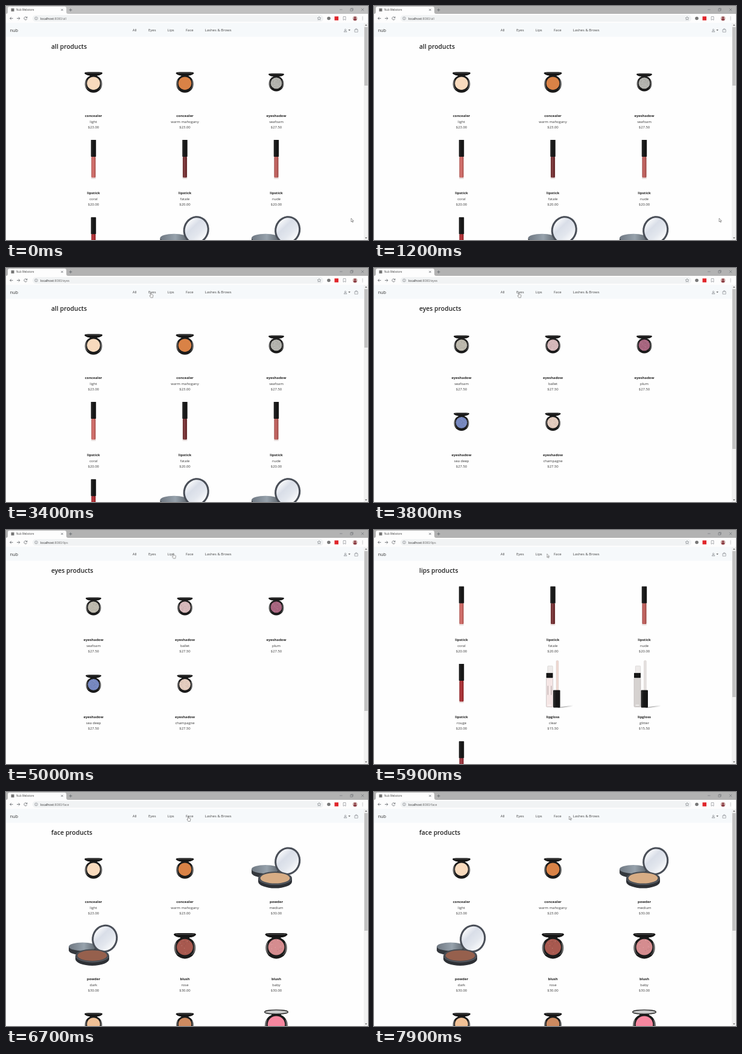
An HTML page that plays this animation: 600x388 px, repeating every 8000 ms.

```html
<!DOCTYPE html>
<html lang="en">
<head>
<meta charset="utf-8">
<title>Nub Webstore</title>
<style>
html, body { margin: 0; width: 100%; height: 100%; overflow: hidden; background: #fefefe; }
svg { display: block; width: 600px; height: 388px; font-family: "Open Sans", "Noto Sans", sans-serif; }
.anim { animation: 8s step-end infinite; }
.mid { text-anchor: middle; }
.line { fill: none; stroke: #5f6368; stroke-width: .8; }
.thin { stroke-width: .5; }
.pale { stroke: #aaa; }

#strip { animation-name: focus; }
#all { animation-name: all; }
#eyes { animation-name: eyes; }
#lips { animation-name: lips; }
#face { animation-name: face; }
#url-all { animation-name: url-all; }
#url-eyes { animation-name: url-eyes; }
#url-lips { animation-name: url-lips; }
#url-face { animation-name: url-face; }
#cursor { animation-name: move; }
#arrow { animation-name: arrow; }
#hand { animation-name: hand; }

@keyframes focus { 0% { fill: #c0c0c0 } 15%, 100% { fill: #b2b2b2 } }

@keyframes all { 0% { opacity: 1 } 45%, 100% { opacity: 0 } }
@keyframes eyes { 0% { opacity: 0 } 45% { opacity: 1 } 63.75%, 100% { opacity: 0 } }
@keyframes lips { 0% { opacity: 0 } 63.75% { opacity: 1 } 80%, 100% { opacity: 0 } }
@keyframes face { 0% { opacity: 0 } 80%, 100% { opacity: 1 } }

@keyframes url-all { 0% { opacity: 1 } 42.5%, 100% { opacity: 0 } }
@keyframes url-eyes { 0% { opacity: 0 } 42.5% { opacity: 1 } 62.5%, 100% { opacity: 0 } }
@keyframes url-lips { 0% { opacity: 0 } 62.5% { opacity: 1 } 78.75%, 100% { opacity: 0 } }
@keyframes url-face { 0% { opacity: 0 } 78.75%, 100% { opacity: 1 } }

@keyframes move {
  0% { transform: translate(572px, 352px) }
  21.25% { transform: translate(556px, 310px) }
  22.5% { transform: translate(497px, 150px) }
  23.75% { transform: translate(449.5px, 57.5px) }
  27.5% { transform: translate(372px, 54px) }
  28.75% { transform: translate(288px, 49px) }
  30% { transform: translate(241px, 46.5px) }
  33.75% { transform: translate(240px, 44px) }
  35% { transform: translate(240px, 42px) }
  36.25% { transform: translate(240px, 40.5px) }
  52.5% { transform: translate(244px, 40px) }
  53.75% { transform: translate(252px, 40px) }
  55% { transform: translate(260px, 40px) }
  56.25% { transform: translate(268px, 39.5px) }
  57.5% { transform: translate(274px, 39px) }
  58.75% { transform: translate(277.5px, 38.5px) }
  73.75% { transform: translate(286.5px, 39.5px) }
  75% { transform: translate(293px, 40px) }
  76.25% { transform: translate(299px, 40px) }
  77.5% { transform: translate(302px, 40px) }
  97.5% { transform: translate(313px, 40px) }
  98.75%, 100% { transform: translate(323.5px, 40px) }
}
@keyframes arrow {
  0% { opacity: 1 } 33.75% { opacity: 0 } 53.75% { opacity: 1 } 56.25% { opacity: 0 }
  73.75% { opacity: 1 } 76.25% { opacity: 0 } 97.5%, 100% { opacity: 1 }
}
@keyframes hand {
  0% { opacity: 0 } 33.75% { opacity: 1 } 53.75% { opacity: 0 } 56.25% { opacity: 1 }
  73.75% { opacity: 0 } 76.25% { opacity: 1 } 97.5%, 100% { opacity: 0 }
}
</style>
</head>
<body>
<svg viewBox="0 0 600 388">
  <defs>
    <linearGradient id="glass" x1="0" y1=".2" x2="1" y2=".8">
      <stop offset="0" stop-color="#fff"/><stop offset=".35" stop-color="#d9dee8"/>
      <stop offset=".65" stop-color="#e3e7ee"/><stop offset="1" stop-color="#fff"/>
    </linearGradient>
    <linearGradient id="lid" x1="0" x2="1">
      <stop offset="0" stop-color="#6f7882"/><stop offset=".55" stop-color="#97a2ac"/><stop offset="1" stop-color="#5d656d"/>
    </linearGradient>
    <linearGradient id="case" x1="0" x2="1">
      <stop offset="0" stop-color="#8a8a8a"/><stop offset=".12" stop-color="#1a1a1a"/>
      <stop offset=".88" stop-color="#1a1a1a"/><stop offset="1" stop-color="#8a8a8a"/>
    </linearGradient>
    <linearGradient id="shade" x1="0" x2="1">
      <stop offset="0" stop-color="#000" stop-opacity=".2"/><stop offset=".35" stop-color="#fff" stop-opacity=".15"/>
      <stop offset="1" stop-color="#000" stop-opacity=".2"/>
    </linearGradient>
    <linearGradient id="fade" x1="0" x2="1">
      <stop offset="0" stop-color="#666"/><stop offset="1" stop-color="#999" stop-opacity="0"/>
    </linearGradient>
  </defs>
  <rect width="600" height="388" fill="#fefefe"/>

  <!-- browser -->
  <rect id="strip" class="anim" width="600" height="13"/>
  <path d="M0 13Q3 13 3 10V4Q3 1 6 1H97Q100 1 100 4V10Q100 13 103 13Z" fill="#fdfdfd"/>
  <rect x="8.5" y="4" width="5" height="5" fill="#777"/>
  <text x="17" y="8.3" font-size="4.4" fill="#444">Nub Webstore</text>
  <path class="line" d="M91.3 4.8l3.2 3.2m0-3.2l-3.2 3.2M104.5 6.5h5m-2.5-2.5v5"/>
  <path class="line thin" d="M553 6h4.5M570.8 4.8h3.4v3.4h-3.4zM571.8 4.8v-1h3.4v3.4h-1M588.8 3.8l4.4 4.4m0-4.4l-4.4 4.4"/>
  <rect y="13" width="600" height="15" fill="#fdfdfd"/>
  <rect x="44" y="15" width="482" height="11" rx="5.5" fill="#f1f3f4"/>
  <path class="line" d="M11.5 20.5h-5m2.3-2.3l-2.3 2.3 2.3 2.3"/>
  <path class="line" d="M18 20.5h5m-2.3-2.3l2.3 2.3-2.3 2.3"/>
  <path class="line" d="M34.6 19.2a2.5 2.5 0 1 0 .2 2.2M35 17.6v2h-2"/>
  <circle class="line thin" cx="50" cy="20.5" r="2.4"/>
  <path class="line thin" d="M50 20.2v1.7M50 18.9v.6"/>
  <g font-size="5.25" fill="#6a6a6a">
    <text x="57" y="22.6"><tspan fill="#222">localhost</tspan>:8080/</text>
    <g id="paths"></g>
  </g>
  <path class="line thin" d="M519 17.6l.9 1.9 2.1.2-1.6 1.4.5 2.1-1.9-1.1-1.9 1.1.5-2.1-1.6-1.4 2.1-.2z"/>
  <circle cx="535" cy="20.5" r="2.8" fill="#777"/>
  <rect x="544.5" y="17.3" width="6.5" height="6.5" fill="#e0262b"/>
  <path class="line thin" d="M559 17.6h4v5.8l-2-1.5-2 1.5z"/>
  <circle cx="578.5" cy="20.5" r="3.8" fill="#c9a5a2"/>
  <path d="M575.7 23a2.9 2.9 0 0 1 5.6 0 3.8 3.8 0 0 1-5.6 0z" fill="#8a3a42"/>
  <circle cx="578.5" cy="19.3" r="1.5" fill="#8a3a42"/>
  <path class="line" d="M591 17.8v.9m0 1.4v.9m0 1.4v.9"/>

  <!-- navigation -->
  <rect y="28" width="593" height="23" fill="#f6f9fb"/>
  <text x="6.5" y="42.6" font-size="7.4" fill="#333">nub</text>
  <g font-size="6" fill="#444">
    <text x="209.8" y="42.2">All</text>
    <text x="236" y="42.2">Eyes</text>
    <text x="267.5" y="42.2">Lips</text>
    <text x="298" y="42.2">Face</text>
    <text x="329.6" y="42.2">Lashes &amp; Brows</text>
  </g>
  <circle class="line thin" cx="562.5" cy="39.5" r="1.2"/>
  <path class="line thin" d="M560.2 43q0-1.9 2.3-1.9t2.3 1.9zM577.9 39.2h5.2v4h-5.2zM579 39.2q0-1.8 1.5-1.8t1.5 1.8"/>
  <path d="M567.3 39.2h3.6l-1.8 1.9z" fill="#444"/>

  <!-- scrollbar -->
  <rect x="593" y="28" width="7" height="360" fill="#f1f1f1"/>
  <path d="M595 32.5h3.6l-1.8-2zM595 383.8h3.6l-1.8 2z" fill="#555"/>

  <g id="pages"></g>

  <g id="cursor" class="anim">
    <path id="arrow" class="anim" d="M0 0V5.9L1.4 4.6 2.4 6.8 3.3 6.4 2.4 4.3H4.2Z" fill="#fff" stroke="#333" stroke-width=".5"/>
    <path id="hand" class="anim" d="M-.7 .6Q0-.4 .7 .6V3.2L3.4 3.9Q4 4.2 3.9 5L3.2 8.6H-.1L-1.9 5.7Q-2 4.8-.7 5.4Z" fill="#fff" stroke="#333" stroke-width=".5"/>
  </g>
</svg>

<script>
const columns = [145, 296.5, 448];
const rowStep = 128.4;

let seed = 7;
const random = () => (seed = seed * 16807 % 2147483647) / 2147483647;

function speckles(count) {
  let out = '';
  for (let i = 0; i < count; i++) {
    const a = random() * 6.283, r = 10 * Math.sqrt(random());
    const fill = i % 2 ? '#fff' : '#444';
    out += `<circle cx="${(r * Math.cos(a)).toFixed(1)}" cy="${(2.2 + r * Math.sin(a)).toFixed(1)}" r=".5" fill="${fill}" opacity=".3"/>`;
  }
  return out;
}

const closedLid = `
  <path d="M-15-14.5Q-15-16.5-9-16.5H9Q15-16.5 15-14.5 13-11.2 6-10.6H-6Q-13-11.2-15-14.5Z" fill="#151515"/>
  <path d="M-12-14.8H12" stroke="#666" stroke-width=".7"/>`;
const openLid = '<ellipse cy="-13.6" rx="14.7" ry="2.6" fill="#c9c9c9" stroke="#222" stroke-width="1"/>';

const compact = (color, scale = 1, dots = 0, lid = closedLid) => `<g transform="scale(${scale})">
  ${lid}
  <rect x="-6" y="-11" width="12" height="4" fill="#1d1d1d"/>
  <circle cy="3.3" r="14.5" fill="url(#case)"/>
  <path d="M-11.6-3.5A13 13 0 0 0-9 12.5M11.6-3.5A13 13 0 0 1 9 12.5" fill="none" stroke="#777" stroke-width=".7"/>
  <circle cy="2.2" r="10.8" fill="${color}"/>${speckles(dots)}</g>`;

const lipstick = color => `
  <rect x="-4" y="-4.5" width="8" height="37" rx="1.5" fill="#ebe3e2"/>
  <rect x="-3.4" y="-5" width="6.8" height="35" rx="1.5" fill="${color}"/>
  <rect x="-3.4" y="-5" width="6.8" height="35" rx="1.5" fill="url(#shade)"/>
  <rect x="-4.2" y="-32.5" width="8.4" height="28" rx=".6" fill="#171717"/>
  <path d="M-2.3-32V-5" stroke="#3b3b3b" stroke-width=".7"/>`;

const powder = color => `
  <path d="M-41 2V8A23 8 0 0 0 5 8V2Z" fill="#34383d"/>
  <ellipse cx="-18" cy="2" rx="23" ry="7" fill="url(#lid)"/>
  <g transform="translate(18.7 -11.4) rotate(18)">
    <ellipse rx="21.4" ry="23.4" fill="#4a4f58"/>
    <ellipse rx="18.3" ry="20.4" fill="url(#glass)"/>
  </g>
  <path d="M-30 17V22.5A28 11 0 0 0 26 22.5V17Z" fill="#2d3035"/>
  <ellipse cx="-2" cy="17" rx="28" ry="11" fill="#484c52"/>
  <path d="M-29 19.5A28 11 0 0 0 25 19.5" fill="none" stroke="#6a7078" stroke-width=".6"/>
  <ellipse cx="-2" cy="16.8" rx="24.4" ry="8.8" fill="${color}"/>`;

const gloss = (color, shift) => `<g transform="translate(${shift})">
  <path d="M8 40L34 35.5 32 38.5 8 40.5Z" fill="url(#fade)"/>
  <rect x="-8.7" y="-29" width="8.4" height="12" rx="1" fill="#eeebea" stroke="#c4c0bf" stroke-width=".5"/>
  <rect x="-11" y="-9" width="11" height="48" rx="1.5" fill="${color}" stroke="#b5b1b0" stroke-width=".6"/>
  <path d="M-8.3 4V19M-2.6 4V19" stroke="#77706f" stroke-width=".6" opacity="${shift ? 0 : 1}"/>
  <path d="M-8.3 36H-2.6" stroke="#fff" stroke-width="1"/>
  <rect x="-11" y="-17.3" width="11" height="8" fill="#161616"/>
  <rect x="5.5" y="-38" width="3.8" height="50" rx="1.6" fill="${shift ? '#e4e0df' : '#efd8d1'}" stroke="#c9bfbb" stroke-width=".4"/>
  <rect x=".6" y="11" width="11.4" height="29" rx="1" fill="#171717"/>
  <path d="M3 12V39" stroke="#444" stroke-width=".7"/></g>`;

// name, shade, price, picture
const light = ['concealer', 'light', '23.00', compact('#f8dabd')];
const mahogany = ['concealer', 'warm mahogany', '23.00', compact('#d98246')];
const shadow = (shade, color) => ['eyeshadow', shade, '27.50', compact(color, .87, 46)];
const stick = (shade, color) => ['lipstick', shade, '20.00', lipstick(color)];
const pressed = (shade, color) => ['powder', shade, '30.00', powder(color)];
const blush = (shade, color, ...look) => ['blush', shade, '30.00', compact(color, ...look)];
const glossy = (shade, color, shift) => ['lipgloss', shade, '15.50', gloss(color, shift)];
const sticks = [stick('coral', '#d3605b'), stick('fatale', '#6f2023'), stick('nude', '#c0534f')];

const pages = {
  all: [132, [light, mahogany, shadow('seafoam', '#b3b3ae'), ...sticks,
    stick('rouge', '#b01c22'), pressed('medium', '#d8ad85'), pressed('dark', '#96604d')]],
  eyes: [300, [shadow('seafoam', '#bdb9ad'), shadow('ballet', '#d6b8ba'), shadow('plum', '#a8657f'),
    shadow('sea deep', '#7688c0'), shadow('champagne', '#e4ccbe')]],
  lips: [277, [...sticks, stick('rouge', '#a81d22'), glossy('clear', '#f5e6e5', 0),
    glossy('glitter', '#d6d2d0', -6), stick('wine', '#9a2630')]],
  face: [230, [light, mahogany, pressed('medium', '#d8ad85'), pressed('dark', '#96604d'),
    blush('rose', '#a8594f', 1.24, 12), blush('baby', '#d58c8f', 1.24, 12),
    ['concealer', 'peach', '23.00', compact('#f1c196')],
    ['concealer', 'amber', '23.00', compact('#cd8a60')],
    blush('pink', '#f6879f', 1.32, 0, openLid)]]
};

const card = ([name, shade, price, picture], i) =>
  `<g transform="translate(${columns[i % 3]} ${126 + rowStep * Math.floor(i / 3)})">${picture}
  <g class="mid" font-size="5.9" fill="#3a3a3a">
    <text y="58" font-weight="700" fill="#222">${name}</text>
    <text y="67.5">${shade}</text>
    <text y="77">$${price}</text>
  </g></g>`;

let body = '', paths = '';
for (const [id, [thumb, items]] of Object.entries(pages)) {
  body += `<g id="${id}" class="anim">
    <text x="75" y="71.3" font-size="10.4" font-weight="600" fill="#222">${id} products</text>
    ${items.map(card).join('')}
    <rect x="594" y="35" width="5.5" height="${thumb - 35}" fill="#c1c1c1"/></g>`;
  paths += `<text id="url-${id}" class="anim" x="94.4" y="22.6">${id}</text>`;
}
document.getElementById('pages').innerHTML = body;
document.getElementById('paths').innerHTML = paths;
</script>
</body>
</html>
```
